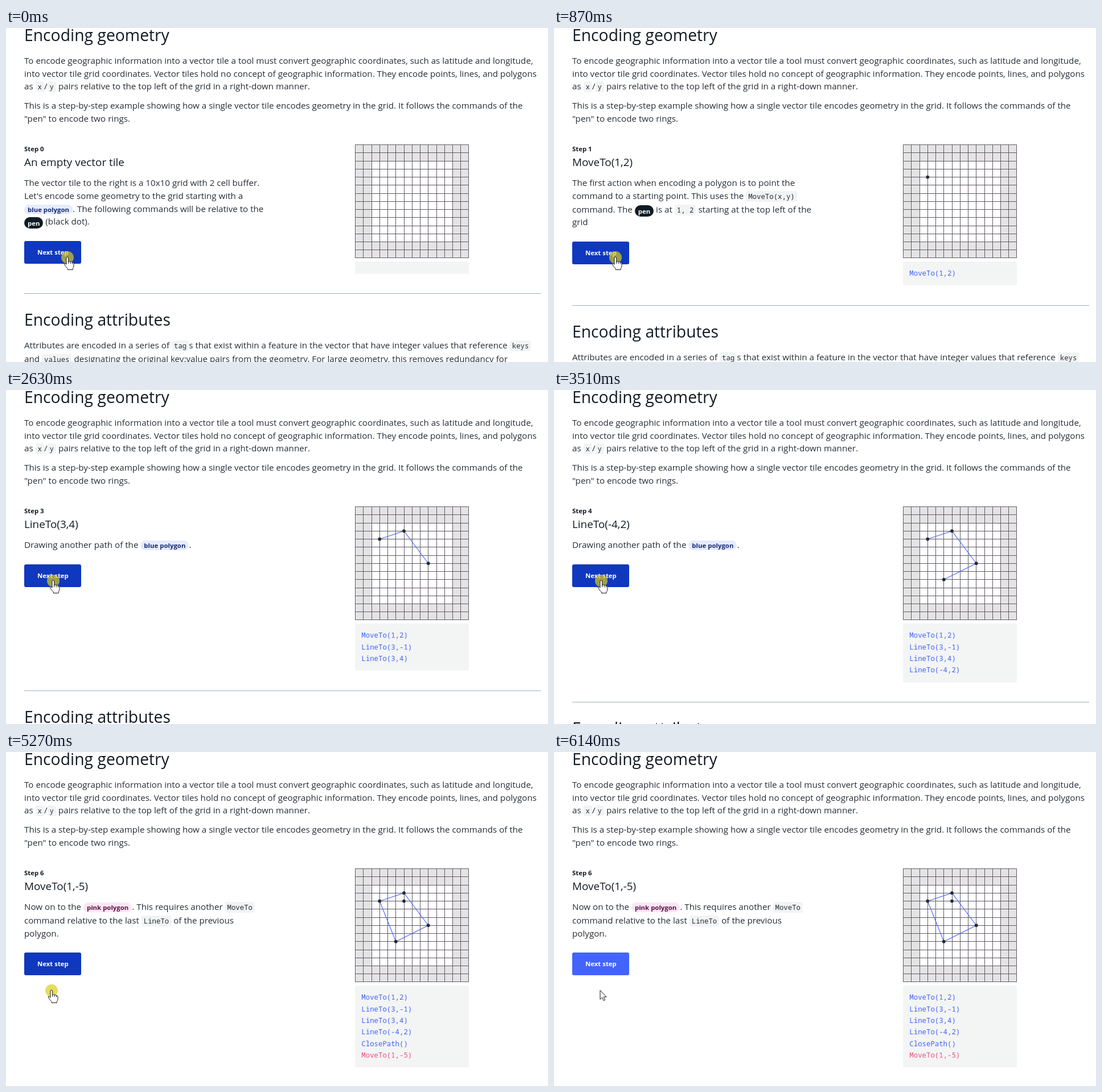
Recreate the animation shown at these times as an HTML page. Size 952x588 px, loop 7.01 s.

```html
<!DOCTYPE html>
<html lang="en">
<head>
<meta charset="utf-8">
<title>Encoding geometry</title>
<style>
html, body { margin: 0; width: 100%; height: 100%; overflow: hidden; background: #fff; }
#stage { position: relative; width: 952px; height: 588px; overflow: hidden;
  font: 15.16px "Open Sans", sans-serif; color: #262e38; }
#stage div, svg { position: absolute; }
/* zero line height: top is the baseline, shifted by the font's half-leading */
.t { line-height: 0; margin-top: -.388em; white-space: nowrap; }
.h2 { font-size: 28.3px; color: #121a24; }
.h3 { font-size: 18.9px; color: #121a24; }
.label { font-size: 11.4px; font-weight: 700; color: #121a24; }
.btn { left: 32px; width: 100px; height: 40px; border-radius: 3px; background: #0f38bf; }
.btn.idle { background: #4264fb; }
.btn .t { left: 23px; top: 24px; color: #fff; }
code, .cmd { font-family: "Noto Sans Mono", monospace; font-size: 12.37px; }
code { background: #f2f4f4; border-radius: 3px; padding: 1px 4px; }
.cmd { color: #4264fb; }
.cmd.pink { color: #ee4e80; }
b { font-size: 11.4px; padding: 1px 6px; border-radius: 10px; }
b.blue { background: #e6ecfd; color: #162a70; }
b.rose { background: #fbe6f3; color: #5b1046; }
b.pen { position: relative; top: 1px; padding: 2.5px 6px; background: #0f1c24; color: #fff; }
.box { left: 613px; top: 411px; width: 200px; border-radius: 2px; background: #f3f4f4; }
.rule { left: 32px; width: 908px; height: 1px; background: #a3b0be; }
svg { left: 0; top: 0; }
</style>
</head>
<body>
<div id="stage"></div>
<script>
const LOOP = 7010, CELL = 14.25, LEFT = 613.5, TOP = 205.5;

const blue = '<b class="blue">blue polygon</b>', pen = '<b class="pen">pen</b>';
const code = s => `<code>${s}</code>`;

// command, its grid point (if it moves the pen)
const commands = [
  ['MoveTo(1,2)', [1, 2]], ['LineTo(3,-1)', [4, 1]], ['LineTo(3,4)', [7, 5]],
  ['LineTo(-4,2)', [3, 7]], ['ClosePath()'], ['MoveTo(1,-5)', [4, 2]]
];

// title, button top, then baseline / text pairs
const steps = [
  ['An empty vector tile', 375,
    278, 'The vector tile to the right is a 10x10 grid with 2 cell buffer.',
    301, "Let's encode some geometry to the grid starting with a",
    324, `${blue}. The following commands will be relative to the`,
    346, `${pen} (black dot).`],
  ['MoveTo(1,2)', 376,
    278, 'The first action when encoding a polygon is to point the',
    301, `command to a starting point. This uses the ${code('MoveTo(x,y)')}`,
    325, `command. The ${pen} is at ${code('1, 2')} starting at the top left of the`,
    347, 'grid'],
  ['LineTo(3,-1)', 376,
    278, 'In order to move from a starting position, we use a',
    301, `${code('LineTo(x,y)')} command. The X and Y values are relative to`,
    325, 'the previous command, rather than the origin of the grid, to',
    347, 'keep file size down.'],
  ['LineTo(3,4)', 307, 278, `Drawing another path of the ${blue}.`],
  ['LineTo(-4,2)', 307, 278, `Drawing another path of the ${blue}.`],
  ['ClosePath()', 399,
    278, `Finally, we close a path. This uses the ${code('ClosePath()')} command`,
    302, `that closes the path to most recently used ${code('MoveTo(x,y)')}`,
    325, 'command, which is our starting point.',
    370, `This DOES NOT move the ${pen}.`],
  ['MoveTo(1,-5)', 353,
    278, `Now on to the <b class="rose">pink polygon</b>. This requires another ${code('MoveTo')}`,
    302, `command relative to the last ${code('LineTo')} of the previous`,
    325, 'polygon.']
];

// start ms, step, pointer x, pointer y, pointer look
const timeline = [
  [0, 0, 108, 404, 'click'], [870, 1, 108, 404, 'click'], [1750, 2, 108, 405, 'hand'],
  [2630, 3, 83, 336, 'click'], [3510, 4, 83, 336, 'click'], [4390, 5, 80, 420, 'hand'],
  [5270, 6, 80, 420, 'click'], [6140, 6, 81, 419.5, 'arrow']
];

const text = (y, s, cls = '', x = 32) =>
  `<div class="t ${cls}" style="left:${x}px;top:${y}px">${s}</div>`;
const svg = s => `<svg width="952" height="588">${s}</svg>`;
const px = ([x, y]) => [LEFT + (x + 2) * CELL, TOP + (y + 2) * CELL];

function grid() {
  let d = '';
  for (let i = 0; i <= 14; i++) {
    const p = Math.min(Math.round(i * CELL), 199);
    d += `M${LEFT + p} ${TOP - .5}v200M${LEFT - .5} ${TOP + p}h200`;
  }
  return `<path fill="#e5e4e5" d="M613 205h200v200h-200z"/>
    <path fill="#fff" d="M642 234h142v142h-142z"/>
    <path stroke="#605a65" fill="none" d="${d}"/>`;
}

function drawing(n) {
  const used = commands.slice(0, n).filter(c => c[1]).map(c => px(c[1]));
  const path = used.slice(0, 4).join('L');
  const dots = used.map(([x, y]) => `<circle cx="${x}" cy="${y}" r="2.9" fill="#232b33"/>`).join('');
  return (path ? `<path d="M${path}${n > 4 ? 'Z' : ''}" fill="none" stroke="#4264fb" stroke-width="1.1"/>` : '') + dots;
}

function pointer(x, y, look) {
  const hand = `<path d="M-2 1Q-2-1-.2-1T1.7 1V7.5Q3.5 5.8 5.2 7.6 7 6.8 8.3 8.6
    10.7 8.2 11 10.8V14.5Q11 17.5 9.2 19.5V21.5H.2V19.5Q-2 17.5-3.8 14.8L-5.6 12
    Q-6.3 9.8-4.3 10.2L-2 12.2Z"/><path d="M1.7 7v4M5.2 7.8v3.4M8.4 8.8v2.6"/>`;
  const arrow = '<path d="M0 0V16L3.7 12.6 6.1 18.2 8.6 17.1 6.2 11.6H11.2Z"/>';
  const halo = '<circle r="11" fill="#dbcd1c" fill-opacity=".7" stroke="none"/>';
  return `<g transform="translate(${x} ${y})" fill="#fff" stroke="#15181c" stroke-linejoin="round">
    ${look === 'click' ? halo : ''}${look === 'arrow' ? arrow : hand}</g>`;
}

function scene([, n, x, y, look]) {
  const [title, top, ...lines] = steps[n];
  const grow = 20.4 * n, rule = Math.round(467.4 + grow);
  let s = text(217, 'Step ' + n, 'label') + text(243.6, title, 'h3');
  for (let i = 0; i < lines.length; i += 2) s += text(lines[i], lines[i + 1]);
  s += `<div class="btn ${look === 'arrow' ? 'idle' : ''}" style="top:${top}px">
    <div class="t label">Next step</div></div>`;
  s += `<div class="box" style="height:${22 + grow}px"></div>`;
  commands.slice(0, n).forEach(([c], i) => {
    s += text(436.9 + 20.4 * i, c, i > 4 ? 'cmd pink' : 'cmd', 624.3);
  });
  s += `<div class="rule" style="top:${rule}px"></div>`;
  s += text(rule + 57, 'Encoding attributes', 'h2');
  s += text(rule + 97, `Attributes are encoded in a series of ${code('tag')}s that exist within a feature in the vector that have integer values that reference ${code('keys')}`);
  s += text(rule + 121, `and ${code('values')} designating the original key:value pairs from the geometry. For large geometry, this removes redundancy for`);
  return s + svg(drawing(n) + pointer(x, y, look));
}

const stage = document.getElementById('stage');
stage.innerHTML = text(23, 'Encoding geometry', 'h2') +
  text(63, 'To encode geographic information into a vector tile a tool must convert geographic coordinates, such as latitude and longitude,') +
  text(86, 'into vector tile grid coordinates. Vector tiles hold no concept of geographic information. They encode points, lines, and polygons') +
  text(108, `as ${code('x')}/${code('y')} pairs relative to the top left of the grid in a right-down manner.`) +
  text(142, 'This is a step-by-step example showing how a single vector tile encodes geometry in the grid. It follows the commands of the') +
  text(165, '"pen" to encode two rings.') +
  svg(grid()) + '<div id="live"></div>';

const live = document.getElementById('live');
let shown;
function tick() {
  const t = performance.now() % LOOP;
  const now = timeline.findLast(s => s[0] <= t);
  if (now !== shown) live.innerHTML = scene(shown = now);
  requestAnimationFrame(tick);
}
tick();
</script>
</body>
</html>
```
